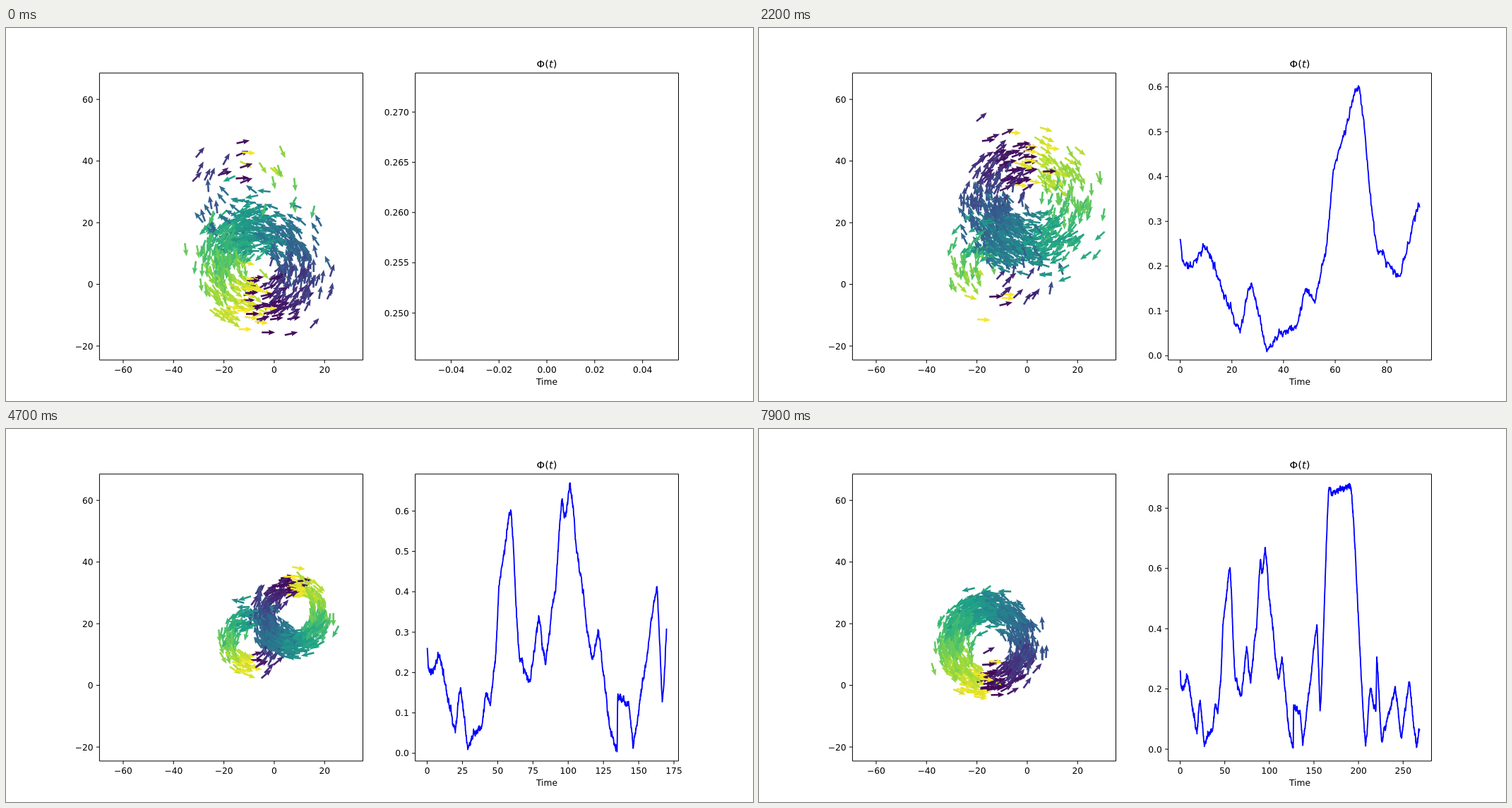
These frames come from a looping animation (1058x529 px, 8000 ms). An HTML page:

```html
<!DOCTYPE html>
<html lang="en">
<head>
<meta charset="utf-8">
<title>Flock and order parameter</title>
<style>
  html, body { margin: 0; width: 100%; height: 100%; overflow: hidden; background: #fff; }
  svg { display: block; width: 100vw; height: 100vh; }
  text { font: 12.25px "DejaVu Sans", sans-serif; fill: #000; }
  .title { font-size: 14.7px; }
  .axis { fill: none; stroke: #000; stroke-width: 1; }
  .curve { fill: none; stroke: #00f; stroke-width: 1.84; stroke-linejoin: round; stroke-linecap: square; }
</style>
</head>
<body>
<svg viewBox="0 0 1058 529">
  <g id="flock"></g>
  <g id="left"></g>
  <path id="curve" class="curve"></path>
  <g id="right"></g>
  <text class="title" x="766" y="56" text-anchor="middle">Φ(<tspan font-style="italic">t</tspan>)</text>
  <text x="766" y="506" text-anchor="middle">Time</text>
</svg>
<script>
const STEP = 100, STEPS = 80, BIRDS = 650, PER_STEP = 24;
const TOP = 63.9, BOTTOM = 470.9, TAU = 2 * Math.PI;
const byId = id => document.getElementById(id);
const mix = (a, b, f) => a + (b - a) * f;

function makeRandom(seed) {
  return () => {
    seed = (seed + 0x6D2B79F5) | 0;
    let t = Math.imul(seed ^ (seed >>> 15), 1 | seed);
    t ^= t + Math.imul(t ^ (t >>> 7), 61 | t);
    return ((t ^ (t >>> 14)) >>> 0) / 4294967296;
  };
}
const random = makeRandom(11);
const gauss = () => Math.sqrt(-2 * Math.log(1 - random())) * Math.cos(TAU * random());

// Finds the pair of keys around s (each key starts with its time) and the fraction between them
function between(keys, s) {
  const n = Math.max(1, keys.findIndex(key => key[0] >= s));
  const from = keys[n - 1], to = keys[n];
  return [from, to, (s - from[0]) / (to[0] - from[0])];
}

// ---- axes ----
function ticks(lo, hi) {
  const raw = (hi - lo) / 9, mag = 10 ** Math.floor(Math.log10(raw));
  const step = mag * [1, 2, 2.5, 5, 10].find(s => s * mag >= raw);
  let digits = 0;
  while (Math.abs(step * 10 ** digits - Math.round(step * 10 ** digits)) > 1e-6) digits++;
  const out = [];
  for (let i = Math.ceil(lo / step); i * step <= hi; i++) {
    const value = i * step || 0;
    out.push([value, value.toFixed(digits).replace('-', '−')]);
  }
  return out;
}

function axes(x0, x1, [xLo, xHi], [yLo, yHi]) {
  let lines = `M${x0} ${TOP}H${x1}V${BOTTOM}H${x0}Z`, labels = '';
  for (const [v, label] of ticks(xLo, xHi)) {
    const x = mix(x0, x1, (v - xLo) / (xHi - xLo));
    lines += `M${x} ${BOTTOM}v4.5`;
    labels += `<text x="${x}" y="489.3" text-anchor="middle">${label}</text>`;
  }
  for (const [v, label] of ticks(yLo, yHi)) {
    const y = mix(BOTTOM, TOP, (v - yLo) / (yHi - yLo));
    lines += `M${x0} ${y}h-4.5`;
    labels += `<text x="${x0 - 8.8}" y="${y + 4.5}" text-anchor="end">${label}</text>`;
  }
  return `<path class="axis" d="${lines}"/>${labels}`;
}

// ---- order parameter: main turning points [step, value], eased, plus a noisy drift ----
const turns = [
  [0, .2596], [.2, .21], [1, .197], [2.1, .247], [5.5, .064], [6.5, .163], [8.1, .019], [9.2, .066],
  [10.7, .065], [11.5, .158], [12.4, .13], [13.3, .228], [14.2, .43], [16.45, .603], [18.1, .228],
  [20.1, .174], [21.9, .337], [23.2, .226], [25.2, .405], [26.4, .63], [27, .58], [28.1, .66], [29.8, .46],
  [32.4, .231], [33.5, .303], [36.2, .04], [37.3, .013], [37.4, .14], [39.6, .115], [40.4, .024],
  [43, .225], [45.1, .417], [46.2, .13], [49, .85], [56.4, .87], [61.2, .014], [62.7, .2],
  [64.6, .113], [64.9, .297], [66.5, .032], [71, .2], [73, .04], [75.6, .222], [78, .004], [79, .06]
];
const trend = [], phi = [];
for (let n = 0, drift = 0; n <= (STEPS - 1) * PER_STEP; n++) {
  const [from, to, f] = between(turns, n / PER_STEP);
  const eased = mix(f, f * f * (3 - 2 * f), .4);
  trend.push(mix(from[1], to[1], eased));
  phi.push(Math.max(.004, trend[n] + drift + (n ? (random() - .5) * .011 : 0)));
  drift = drift * .88 + (random() - .5) * .011;
}

function drawOrder(k) {
  const seen = trend.slice(0, k * PER_STEP + 1);
  const lo = Math.min(...seen), hi = Math.max(...seen);
  const end = k ? 24.8 + 3.084 * k : 0;
  const xPad = k ? end * .05 : .055, yPad = k ? (hi - lo) * .05 : hi * .055;
  byId('right').innerHTML = axes(579.6, 952.5, [-xPad, end + xPad], [lo - yPad, hi + yPad]);
  const points = seen.map((_, n) => {
    const y = mix(BOTTOM, TOP, (phi[n] - lo + yPad) / (hi - lo + 2 * yPad));
    return `${(596.7 + 338.8 * n / (k * PER_STEP)).toFixed(2)} ${y.toFixed(2)}`;
  });
  byId('curve').setAttribute('d', k ? 'M' + points.join('L') : '');
}

// ---- flock: a counter-clockwise mill and a clockwise loop that share a leftward stream ----
// [step, share of birds in loop, spread, mill x, y, radius, loop x, y, radius]
const phases = [
  [0, .09, 19, 357, 337, 53, 335, 238, 56],
  [16, .85, 20, 352, 332, 30, 381, 248, 60],
  [29, .8, 19, 318, 340, 52, 383, 245, 60],
  [47, .78, 9, 350, 302, 34, 405, 264, 40],
  [60, 0, 15, 338, 329, 55, 360, 260, 40],
  [79, 0, 11, 323, 307, 52, 360, 260, 40]
];
const mill = { turn: 1, dense: 2.2, crowding: .3 };
const loop = { turn: -1, dense: 4.05, crowding: .72 };

const birds = Array.from({ length: BIRDS }, (_, i) => ({
  lap: (i * .618034) % 1, rank: random(), dx: gauss(), dy: gauss(), sway: gauss() * .2
}));

const viridis = ['440154', '46327e', '365c8d', '277f8e', '1fa187', '4ac16d', 'a0da39', 'fde725']
  .map(hex => [0, 2, 4].map(i => parseInt(hex.slice(i, i + 2), 16)));
function headingColor(angle) {
  const f = (angle / TAU % 1 + 1) % 1 * 7, i = Math.min(6, Math.floor(f));
  return `rgb(${viridis[i].map((c, j) => Math.round(mix(c, viridis[i + 1][j], f - i)))})`;
}

function drawFlock(k) {
  const [from, to, f] = between(phases, k);
  const [, share, spread, ...rings] = from.map((v, i) => mix(v, to[i], f));
  byId('flock').innerHTML = birds.map(({ lap, rank, dx, dy, sway }) => {
    const inLoop = rank < share, { turn, dense, crowding } = inLoop ? loop : mill;
    const [cx, cy, radius] = rings.slice(inLoop ? 3 : 0);
    const phase = TAU * (lap + turn * k * .045);
    const around = phase - crowding * Math.sin(phase - dense);
    const x = cx + radius * Math.cos(around) + dx * spread;
    const y = cy - radius * Math.sin(around) + dy * spread;
    // headings follow the displaced place, softened near the centre
    const swirl = Math.atan2(cy - y + radius * Math.sin(around), x - cx + radius * Math.cos(around));
    const angle = swirl + turn * TAU / 4 + sway;
    return `<path fill="${headingColor(angle)}" d="M-9.5-1.3H1L0-3.8 9.5 0 0 3.8 1 1.3H-9.5Z" ` +
      `transform="translate(${x.toFixed(1)} ${y.toFixed(1)}) rotate(${(-angle * 360 / TAU).toFixed(1)})"/>`;
  }).join('');
}

byId('left').innerHTML = axes(132.4, 505.5, [-69.42, 35.21], [-24.54, 68.54]);

const start = performance.now();
let shown = -1;
function tick() {
  const k = Math.floor((performance.now() - start) / STEP) % STEPS;
  if (k !== shown) {
    shown = k;
    drawFlock(k);
    drawOrder(k);
  }
  requestAnimationFrame(tick);
}
tick();
</script>
</body>
</html>
```
